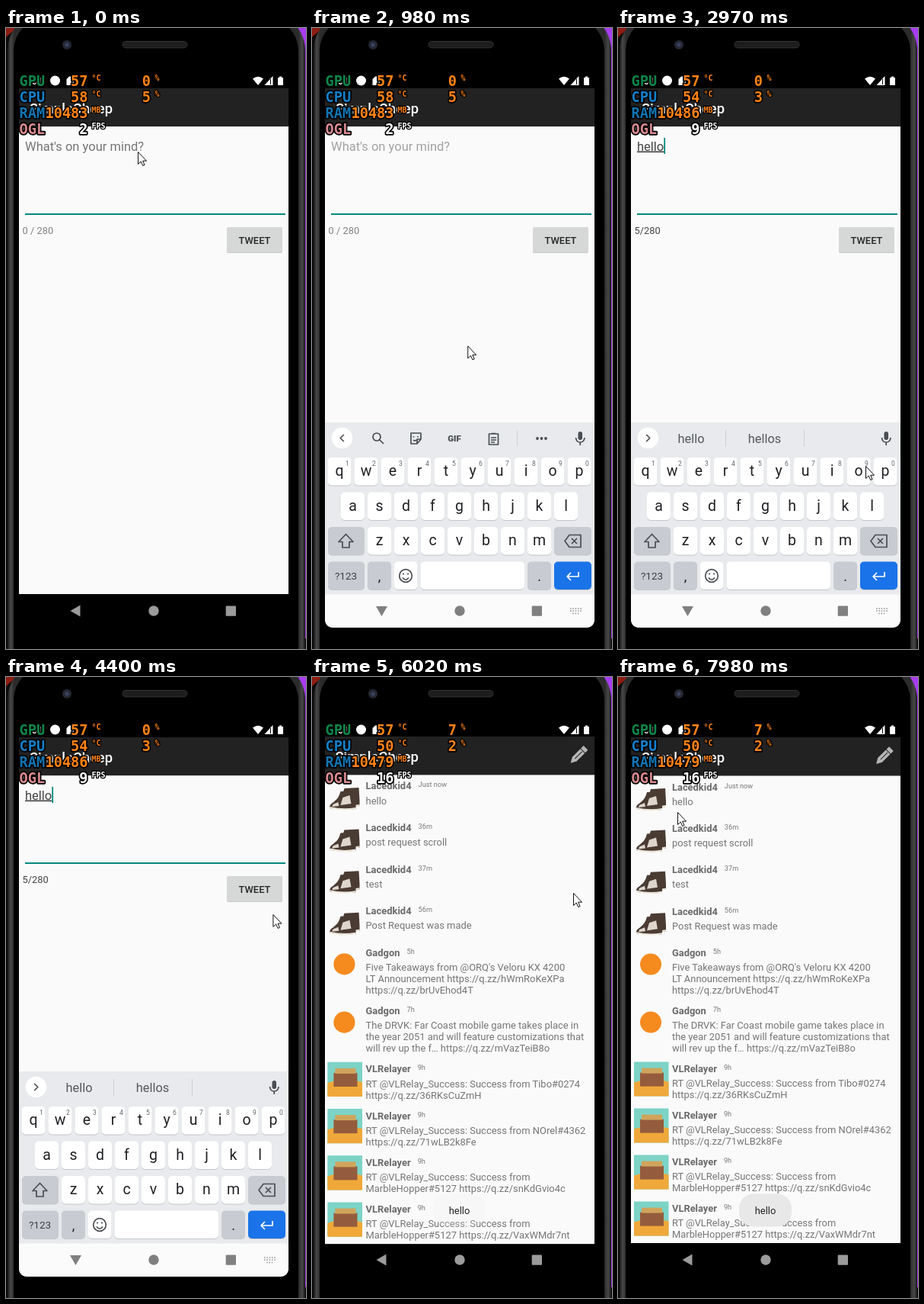
These frames come from a looping animation (394x814 px, 8 s). An HTML page:

```html
<!DOCTYPE html>
<html lang="en">
<head>
<meta charset="utf-8">
<title>Compose and post</title>
<style>
  html, body { margin: 0; width: 100%; height: 100%; overflow: hidden; background: #000; }
  svg { display: block; width: 394px; height: 814px; font-family: Roboto, sans-serif; }
  .mid { text-anchor: middle; }
  .osd text { font: bold 18.6px "DejaVu Sans Mono", monospace; paint-order: stroke; stroke: #000; stroke-width: 3.4px; stroke-linejoin: round; }
  .osd .unit { font-size: 10px; stroke-width: 2.6px; }
  .osd .val { text-anchor: end; }
  .line { fill: none; stroke: #4a4d51; stroke-width: 1.7; stroke-linejoin: round; }
  #typed { text-decoration: underline #8a8a8a 1px; }
</style>
</head>
<body>
<svg viewBox="0 0 394 814">
  <defs>
    <clipPath id="screen"><path d="M17 58H371V774Q371 786 359 786H29Q17 786 17 774Z"/></clipPath>
    <clipPath id="pane"><rect x="17" y="78" width="354" height="666"/></clipPath>
    <linearGradient id="rim">
      <stop offset="0" stop-color="#151515"/><stop offset=".01" stop-color="#484848"/>
      <stop offset=".022" stop-color="#2b2b2b"/><stop offset=".978" stop-color="#2b2b2b"/>
      <stop offset=".99" stop-color="#484848"/><stop offset="1" stop-color="#151515"/>
    </linearGradient>
  </defs>

  <rect width="394" height="814" fill="#0d0b0c"/>
  <path d="M0 0H14L0 12Z" fill="#8e1c12"/>
  <path d="M360 0H394V800H391Z" fill="#a63df0"/>
  <rect x="2" y="-22" width="391" height="900" rx="52" fill="url(#rim)"/>
  <rect x="10" y="-14" width="374" height="890" rx="44"/>
  <rect x="153" y="17.5" width="85" height="8.5" rx="4.2" fill="#1d1d1d" stroke="#333"/>
  <circle cx="80" cy="22" r="6" fill="#252833"/><circle cx="80" cy="22" r="2.6" fill="#3a4360"/>

  <g clip-path="url(#screen)">
    <rect x="17" y="58" width="354" height="728"/>
    <g fill="#fff">
      <text x="23" y="73.5" font-size="12.9" font-weight="500">7:54</text>
      <circle cx="64.5" cy="69" r="6.5"/>
      <path d="M83 63.5H89V75H79.5V67Z"/>
      <path d="M324 66.5Q331 61 338 66.5L331 75Z"/>
      <path d="M350.500 63V75H339.500Z"/><path d="M347.500 67V74" stroke="#000"/>
      <path d="M357 65H359V63.500H362V65H364V75H357Z"/>
    </g>
    <g id="compose">
      <rect x="17" y="79" width="354" height="663" fill="#fafafa"/>
      <rect x="17" y="79" width="354" height="50" fill="#222"/>
      <rect x="17" y="129" width="354" height="1" fill="#e2e2e2"/>
      <text x="31" y="112" font-size="18.4" font-weight="500" fill="#fff">SimpleCheep</text>
      <text id="hint" x="25" y="160.5" font-size="16.5">What's on your mind?</text>
      <text id="typed" x="25" y="160.5" font-size="16.5" fill="#444"></text>
      <rect id="caret" y="144" width="1.8" height="21" fill="#00897b"/>
      <rect x="25" y="243" width="342" height="2" fill="#07897d"/>
      <text id="count" x="21.5" y="269.5" font-size="12.9"></text>
      <rect x="290" y="262" width="73" height="33" rx="2" fill="#c9c9c9"/>
      <rect id="button" x="290" y="261" width="73" height="33" rx="2"/>
      <text class="mid" x="326.5" y="282.5" font-size="12.9" font-weight="500" fill="#262626">TWEET</text>
    </g>
    <g clip-path="url(#pane)"><g id="feed">
      <rect x="17" y="79" width="354" height="663" fill="#fafafa"/>
      <rect x="17" y="79" width="354" height="50.5" fill="#222"/>
      <text x="31" y="112" font-size="18.4" font-weight="500" fill="#fff">SimpleCheep</text>
      <g transform="translate(349 104) rotate(45)" fill="#b5b5b5">
        <path d="M-4-14H4V-9H-4ZM-4-8H4V7L0 14L-4 7Z"/><path d="M0-7V6" stroke="#222"/>
      </g>
    </g></g>
    <g id="board"></g>
    <g id="nav">
      <path id="back" d="M-7 0L6 -7.5V7.5Z"/>
      <circle cx="194" cy="764" r="6.7"/><rect x="288.7" y="757.5" width="13.3" height="13.3" rx="1"/>
      <path id="dots" d="M339 761H354M339 764H354M342 767.5H351" fill="none" stroke="#999" stroke-width="1.7" stroke-dasharray="1.7 1.6"/>
    </g>
    <rect id="pill" x="159" y="677.5" width="69" height="43" rx="19" fill="#e8e8e8"/>
    <text id="note" class="mid" x="193.5" y="703.5" font-size="12.9" fill="#222">hello</text>
  </g>
  <g id="osd" class="osd"></g>
  <path id="mouse" d="M.5 .5V16.500L4.200 13L6.700 18.500L9 17.500L6.600 12.200H11.500Z" fill="#fff" stroke="#111"/>
</svg>
<script>
const $ = id => document.getElementById(id);
const add = (parent, tag, attrs, text) => {
  const n = document.createElementNS('http://www.w3.org/2000/svg', tag);
  for (const k in attrs) n.setAttribute(k, attrs[k]);
  if (text !== undefined) n.textContent = text;
  return parent.appendChild(n);
};
const set = (id, attrs) => { for (const k in attrs) $(id).setAttribute(k, attrs[k]); };
const show = (node, on) => { node.style.display = on ? '' : 'none'; };

// Feed
const rows = [
  ['shoe', 'Lacedkid4', 'Just now', 'hello'],
  ['shoe', 'Lacedkid4', '36m', 'post request scroll'],
  ['shoe', 'Lacedkid4', '37m', 'test'],
  ['shoe', 'Lacedkid4', '56m', 'Post Request was made'],
  ['disc', 'Gadgon', '5h', "Five Takeaways from @ORQ's Veloru KX 4200", 'LT Announcement https://q.zz/hWmRoKeXPa', 'https://q.zz/brUvEhod4T'],
  ['disc', 'Gadgon', '7h', 'The DRVK: Far Coast mobile game takes place in', 'the year 2051 and will feature customizations that', 'will rev up the f… https://q.zz/mVazTeiB8o'],
  ['hut', 'VLRelayer', '9h', 'RT @VLRelay_Success: Success from Tibo#0274', 'https://q.zz/36RKsCuZmH'],
  ['hut', 'VLRelayer', '9h', 'RT @VLRelay_Success: Success from NOrel#4362', 'https://q.zz/71wLB2k8Fe'],
  ['hut', 'VLRelayer', '9h', 'RT @VLRelay_Success: Success from', 'MarbleHopper#5127 https://q.zz/snKdGvio4c'],
  ['hut', 'VLRelayer', '9h', 'RT @VLRelay_Success: Success from', 'MarbleHopper#5127 https://q.zz/VaxWMdr7nt']
];
const shape = (p, d, fill) => add(p, 'path', { d, fill });
const faces = {
  shoe(g) {
    for (const shift of ['5 -1', '0 3']) {
      const s = add(g, 'g', { transform: `translate(${shift})` });
      shape(s, 'M17 4L36 3L37 20V27Q20 29 3 26Q2 21 8 18Q15 13 17 4Z', '#4a3b33');
      shape(s, 'M20 12L29 9L31 20L17 22ZM7 21L14 18L15 23L6 24Z', '#ded6cc');
      shape(s, 'M3 24Q20 28 37 25V27Q20 30 3 26Z', '#efe9de');
    }
  },
  disc(g) { add(g, 'circle', { cx: 22, cy: 15, r: 14, fill: '#f58a1f' }); },
  hut(g) {
    shape(g, 'M0 -9H45.500V36H0Z', '#7cd3c6');
    shape(g, 'M0 18Q24 10 45.500 17V36H0Z', '#f0a83a');
    shape(g, 'M8 5H39V23H8Z', '#945c3d');
    shape(g, 'M10 -1H37V6H10Z', '#d0a45c');
  }
};
const lead = 15;
let y = 144;
for (const [face, name, age, ...lines] of rows) {
  faces[face](add($('feed'), 'g', { transform: `translate(21 ${y})` }));
  const head = add($('feed'), 'text', { x: 71, y: y + 4.5, 'font-size': 12.9, 'font-weight': 700, fill: '#6a6a6a' }, name);
  add(head, 'tspan', { dx: 9, dy: -3, 'font-size': 9.2, 'font-weight': 400, fill: '#777' }, age);
  lines.forEach((s, i) => add($('feed'), 'text', { x: 71, y: y + 23.6 + i * lead, 'font-size': 12.9, fill: '#757575' }, s));
  y += Math.max(54.4, 31 + lead * lines.length);
}

// Keyboard
const board = $('board'), keyAt = {};
add(board, 'rect', { x: 17, y: 517, width: 354, height: 270, fill: '#e8eaed' });
add(board, 'rect', { x: 17, y: 742.5, width: 354, height: 320, fill: '#fbfbfb' });
const gray = '#c8cbd1';
const key = (x, y, w, fill = '#fff') => {
  add(board, 'rect', { x, y: y + 1, width: w, height: 36.5, rx: 5, fill: '#c3c6ca' });
  add(board, 'rect', { x, y, width: w, height: 36.5, rx: 5, fill });
};
const label = (p, x, y, size, s, fill = '#202124') => add(p, 'text', { class: 'mid', x, y, 'font-size': size, fill }, s);
const icon = (p, d) => add(p, 'path', { class: 'line', d });
['qwertyuiop', 'asdfghjkl', 'zxcvbnm'].forEach((s, r) => {
  const top = 563 + 45.5 * r;
  [...s].forEach((c, i) => {
    const x = 193.5 + 35 * (i - (s.length - 1) / 2);
    keyAt[c] = [x, top];
    key(x - 15.5, top, 31);
    label(board, x, top + 24.3, 19.5, c);
    if (!r) label(board, x + 10.5, top + 10.5, 8.5, (i + 1) % 10, '#5f6368');
  });
});
for (const row of [654, 699.5]) key(21, row, 48, gray);
for (const x of [73, 283]) key(x, 699.5, 31, gray);
key(318, 654, 49, gray);
key(108, 699.5, 30.5);
key(142.5, 699.5, 136.5);
key(318, 699.5, 49, '#1a73e8');
label(board, 44.5, 723, 13.5, '?123', '#3c4043');
label(board, 88.5, 725, 18, ',');
label(board, 298.5, 725, 18, '.');
icon(board, 'M44.5 663.5L54 673.5H49V681H40V673.5H35Z');
icon(board, 'M332 672.5L338 664.5H353V680.5H338ZM341 669L348 676M348 669L341 676');
icon(board, 'M350 713V719H335M340 714L335 719L340 724').style.stroke = '#fff';
icon(board, 'M114.7 718a8.3 8.3 0 1 0 16.6 0a8.3 8.3 0 1 0 -16.6 0M119 720.5Q123 726 127 720.5M120 714.5V716.5M126 714.5V716.5');
add(board, 'circle', { cx: 39.5, cy: 537.5, r: 13.7, fill: '#fff' });
const chevron = icon(board, 'M-2.3 -4.5L2.3 0L-2.3 4.5');
add(board, 'rect', { x: 349.5, y: 529, width: 5.5, height: 11, rx: 2.7, fill: '#4a4d51' });
icon(board, 'M346.5 537Q347 543 352.2 543Q357.5 543 358 537M352.2 543V547');

const tools = add(board, 'g', {});
icon(tools, 'M80 536a5 5 0 1 0 10 0a5 5 0 1 0 -10 0M89 540L94 545');
icon(tools, 'M130 531H143V539L138 545H130ZM143 539H138V545M133.5 535V536.5M139 535V536.5M133 540Q135 542 137 540');
label(tools, 187, 542, 11.5, 'GIF', '#4a4d51').style.fontWeight = 900;
icon(tools, 'M232.5 532H244.5V546H232.5ZM235.5 531.5H241.5M235 537H242M235 540H242M235 543H240');
add(tools, 'path', { d: 'M269.5 528V548', stroke: '#d0d3d7' });
for (const x of [296, 301.5, 307]) add(tools, 'circle', { cx: x, cy: 538, r: 1.9, fill: '#4a4d51' });

const strip = add(board, 'g', {});
add(strip, 'path', { d: 'M141.5 527V549M244.5 527V549', stroke: '#cdd0d4' });
const picks = [96, 192.5, 289.5].map(x => label(strip, x, 543.5, 16.4, '', '#55585c'));

const bubble = add(board, 'g', {});
add(bubble, 'rect', { x: -16.5, y: -63, width: 35, height: 101, rx: 4, fill: '#a9adb4' });
add(bubble, 'rect', { x: -17.5, y: -64, width: 35, height: 101, rx: 4, fill: '#c6cad2' });
const bubbleKey = label(bubble, 0, -29, 25, '');
const bubbleMore = label(bubble, 9, -18, 11, '...');

// Monitor overlay
const monitor = [['GPU', '#0f8549', '°C', '%'], ['CPU', '#147fc8', '°C', '%'], ['RAM', '#1274b2', 'MB'], ['OGL', '#d98a8f', 'FPS']];
const read = monitor.flatMap(([name, tint, ...units], i) => {
  const y = 75.5 + 21 * i, fill = i < 3 ? '#ff8217' : '#fff';
  add($('osd'), 'text', { x: 17.5, y, fill: tint }, name);
  return units.map((u, j) => {
    add($('osd'), 'text', { class: 'unit', x: 112.5 + 83 * j, y: y - 7, fill }, u);
    return add($('osd'), 'text', { class: 'val', x: 107.5 + 82.5 * j, y, fill });
  });
});

// Motion
const word = 'hello', dictionary = ['hi', 'hello', 'hellos'];
const firstPress = 1473, gap = 337, hold = 148;
const stops = [ // arrive, leave, x, y
  [0, 450, 173, 162], [1400, 1600, 229, 618], [1790, 1970, 107, 584], [2140, 2640, 334, 622], [2810, 3300, 325, 574],
  [3890, 3890, 374, 400], [4560, 6500, 343, 283], [7270, 7270, 62, 152], [7560, 7700, 101, 146], [7970, 8000, 78, 177]
];
const stats = [ // from, then the readings top to bottom
  [0, 57, 0, 58, 5, 10483, 2], [1130, 57, 0, 55, 2, 10481, 17], [2830, 57, 0, 54, 3, 10486, 9],
  [5410, 57, 7, 50, 2, 10479, 2], [5900, 57, 7, 50, 2, 10479, 16]
];
const ramp = (t, a, b) => Math.min(1, Math.max(0, (t - a) / (b - a)));

function pointer(t) {
  const i = stops.findLastIndex(s => s[0] <= t);
  const [, leave, x, y] = stops[i], [arrive, , nx, ny] = stops[i + 1] || stops[i];
  const p = t > leave ? ramp(t, leave, arrive) : 0;
  return [x + (nx - x) * p, y + (ny - y) * p];
}

function draw(t) {
  // Typing
  const stroke = Math.floor((t - firstPress) / gap), since = (t - firstPress) - stroke * gap;
  const hit = since < hold ? word[stroke] : undefined;
  const typed = word.slice(0, Math.max(0, hit ? stroke : stroke + 1));
  const lastKey = typed ? firstPress + (typed.length - 1) * gap + hold : 300;
  $('typed').textContent = typed;
  $('count').textContent = typed ? typed.length + '/280' : '0 / 280';
  set('count', { fill: typed ? '#444' : '#808080' });
  set('hint', { fill: t < 150 ? '#757575' : '#a2a2a2' });
  show($('hint'), !typed);
  set('caret', { x: 25 + $('typed').getComputedTextLength() });
  show($('caret'), t >= 300 && !hit && (t - lastKey) % 1000 < 500);
  set('button', { fill: t >= 5630 ? '#c8c9c9' : '#d6d7d7' });

  // Keyboard slides in, later drops away
  const dy = 270 * ((1 - ramp(t, 90, 402)) ** 3 + ramp(t, 5840, 6000) ** 2);
  const up = t >= 150 && dy < 270;
  const turn = -90 * (ramp(t, 150, 430) - ramp(t, 5840, 6000));
  set('board', { transform: `translate(0 ${dy})` });
  show(board, up);
  show(tools, !typed);
  show(strip, typed);
  const offers = [typed, ...dictionary.filter(s => s !== typed && s.startsWith(typed))];
  picks.forEach((p, i) => { p.textContent = offers[i] || ''; });
  chevron.setAttribute('transform', `translate(39.5 537.5) scale(${typed ? 1 : -1} 1)`);
  show(bubble, hit);
  if (hit) {
    bubble.setAttribute('transform', `translate(${keyAt[hit]})`);
    bubbleKey.textContent = hit;
    show(bubbleMore, 'eo'.includes(hit));
  }
  set('nav', { fill: up ? '#808080' : '#9b9b9b' });
  set('back', { transform: `translate(91.5 764) rotate(${turn})` });
  show($('dots'), up);

  // Feed settles in, toast fades up
  const size = 1 + .1 * (1 - ramp(t, 5780, 6140)) ** 3;
  set('feed', { opacity: ramp(t, 5790, 5970), transform: `translate(194 436) scale(${size}) translate(-194 -436)` });
  set('note', { opacity: ramp(t, 5600, 5980) });
  set('pill', { opacity: ramp(t, 5990, 6140) });

  const now = stats.findLast(s => s[0] <= t);
  read.forEach((n, i) => { n.textContent = now[i + 1]; });
  set('mouse', { transform: `translate(${pointer(t)})` });
}

let start;
function tick(now) {
  start ??= now;
  draw((now - start) % 8000);
  requestAnimationFrame(tick);
}
draw(0);
requestAnimationFrame(tick);
</script>
</body>
</html>
```
